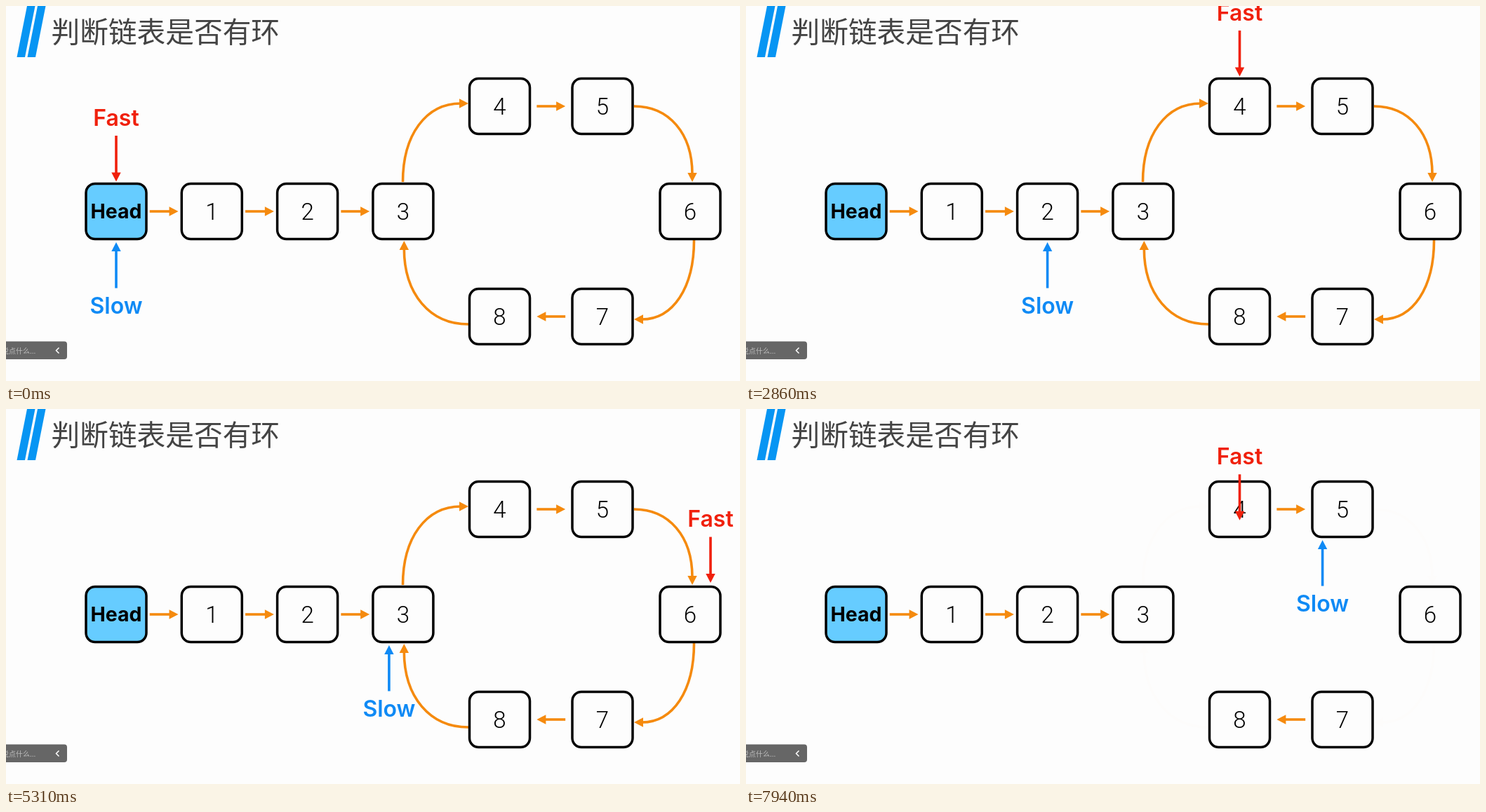
Animation, 1046 px wide and 535 px high, one loop 8 s. Source, as an HTML page:

```html
<!DOCTYPE html>
<html lang="zh">
<head>
<meta charset="utf-8">
<title>Linked list cycle</title>
<style>
  html, body { margin: 0; width: 100%; height: 100%; overflow: hidden; background: #fdfdfd; }
  svg { display: block; width: 100%; height: 100%; }
  text { text-anchor: middle; }
  .title { font: 300 40.7px "Noto Sans CJK SC", "Noto Sans CJK", sans-serif; fill: #444; text-anchor: start; }
  .digit { font: 300 33px Roboto, sans-serif; }
  .head { font: 700 28.5px Inter, sans-serif; }
  .label { font: 600 32px Inter, sans-serif; }
  .hint { font: 10px "Noto Sans CJK SC", "Noto Sans CJK", sans-serif; fill: #bdbdbd; text-anchor: start; }
</style>
</head>
<body>
<svg id="stage" viewBox="0 0 1046 535">
  <path fill="#0795f3" d="M30 0h11.500l-14.500 73h-11.500zm15 0h11.500l-14.500 73h-11.500z"/>
  <text class="title" x="64.500" y="52">判断链表是否有环</text>
  <g id="links"></g>
  <g id="curves"></g>
  <g id="nodes"></g>
  <rect x="-8" y="478.500" width="95" height="25.500" rx="4" fill="#666"/>
  <text class="hint" x="-6" y="495.500">说点什么...</text>
  <path d="M75.500 487.500l-4 4l4 4" fill="none" stroke="#fff" stroke-width="1.500"/>
  <g id="fast"></g>
  <g id="slow"></g>
</svg>
<script>
const ORANGE = '#f58a0e', RED = '#f0200c', BLUE = '#0f8af5';
const LOOP = 8000, MOVE = 575, FADE = 0.31;
const MOVE_STARTS = [943, 1863, 3343, 6373, 7533];
const TOP = 143, MIDDLE = 293, BOTTOM = 443;
const RING_START = 3, LAST = 8;
const $ = id => document.getElementById(id);

// A straight tail, then a ring; the dodge keeps pointers clear of the curves.
const nodes = [0, 1, 2, 3].map(i => ({ x: 157 + 136.3 * i, y: MIDDLE }));
nodes.push(
  { x: 703.5, y: TOP }, { x: 850, y: TOP }, { x: 975, y: MIDDLE },
  { x: 850, y: BOTTOM }, { x: 703.5, y: BOTTOM }
);
nodes[3].dodge = { x: -20, y: 0 };
nodes[6].dodge = { x: 29, y: -2.5 };

// An arrow that leaves along one axis and arrives along the other.
function arrow(x0, y0, x1, y1, color, arriveVertical = false) {
  const dx = arriveVertical ? 0 : Math.sign(x1 - x0);
  const dy = arriveVertical ? Math.sign(y1 - y0) : 0;
  const endX = x1 - 11 * dx, endY = y1 - 11 * dy;
  const reachX = (endX - x0) * 0.6, reachY = (endY - y0) * 0.6;
  const bend = arriveVertical
    ? [x0 + reachX, y0, endX, endY - reachY]
    : [x0, y0 + reachY, endX - reachX, endY];
  const angle = Math.atan2(dy, dx) * 180 / Math.PI;
  return `<path d="M${x0} ${y0}C${bend} ${endX} ${endY}" fill="none" stroke="${color}" stroke-width="3.6"/>
    <path d="M0 0l-13 -6.700v13.400z" fill="${color}" transform="translate(${x1} ${y1}) rotate(${angle})"/>`;
}

// Neighbours in one row share a short arrow centred in the gap.
function rowLink(node, i) {
  const next = nodes[i + 1];
  if (!next || next.y !== node.y) return '';
  const middle = (node.x + next.x) / 2, half = 20.4 * Math.sign(next.x - node.x);
  return arrow(middle - half, node.y, middle + half, node.y, ORANGE);
}

function box({ x, y }, i) {
  const isHead = i === 0;
  return `<rect x="${x - 43}" y="${y - 39.5}" width="86" height="79" rx="13"
      fill="${isHead ? '#66ccff' : '#fdfdfd'}" stroke="#000" stroke-width="3.5"/>
    <text class="${isHead ? 'head' : 'digit'}" x="${x}" y="${y + (isHead ? 10 : 11.5)}">${i || 'Head'}</text>`;
}

// Pointers are drawn with the arrow tip at the origin.
const pointer = (label, dir, baseline, color) =>
  arrow(0, -65.5 * dir, 0, 0, color, true) +
  `<text class="label" y="${baseline}" fill="${color}">${label}</text>`;

$('links').innerHTML = nodes.map(rowLink).join('');
$('curves').innerHTML =
  arrow(565.5, 251, 659, 139, ORANGE) +
  arrow(895, 143, 978, 251, ORANGE, true) +
  arrow(980.5, 334, 895, 447, ORANGE) +
  arrow(659, 454, 567.3, 335, ORANGE, true);
$('nodes').innerHTML = nodes.map(box).join('');
$('fast').innerHTML = pointer('Fast', 1, -79.7, RED);
$('slow').innerHTML = pointer('Slow', -1, 101.5, BLUE);

const clamp = v => Math.min(1, Math.max(0, v));
const ease = v => (1 - Math.cos(Math.PI * clamp(v))) / 2;
const mix = (a, b, p) => a + (b - a) * p;

function stop(hops, offsetY) {
  const index = hops > LAST ? hops - LAST - 1 + RING_START : hops;
  const { x, y, dodge = { x: 0, y: 0 } } = nodes[index];
  return { x: x + dodge.x, y: y + offsetY + dodge.y };
}

function place(id, speed, offsetY, step, p) {
  const from = stop(step * speed, offsetY), to = stop((step + 1) * speed, offsetY);
  $(id).setAttribute('transform', `translate(${mix(from.x, to.x, p)} ${mix(from.y, to.y, p)})`);
}

function render(t) {
  const step = Math.max(0, MOVE_STARTS.filter(start => t >= start).length - 1);
  const u = clamp((t - MOVE_STARTS[step]) / MOVE);
  place('fast', 2, -42.5, step, ease(u));
  place('slow', 1, 44, step, ease(u));
  // Curved links fade out as a move begins and return as it ends.
  $('curves').setAttribute('opacity', ease(1 - u / FADE) + ease(1 - (1 - u) / FADE));
}

function tick() {
  render(performance.now() % LOOP);
  requestAnimationFrame(tick);
}
tick();
</script>
</body>
</html>
```
